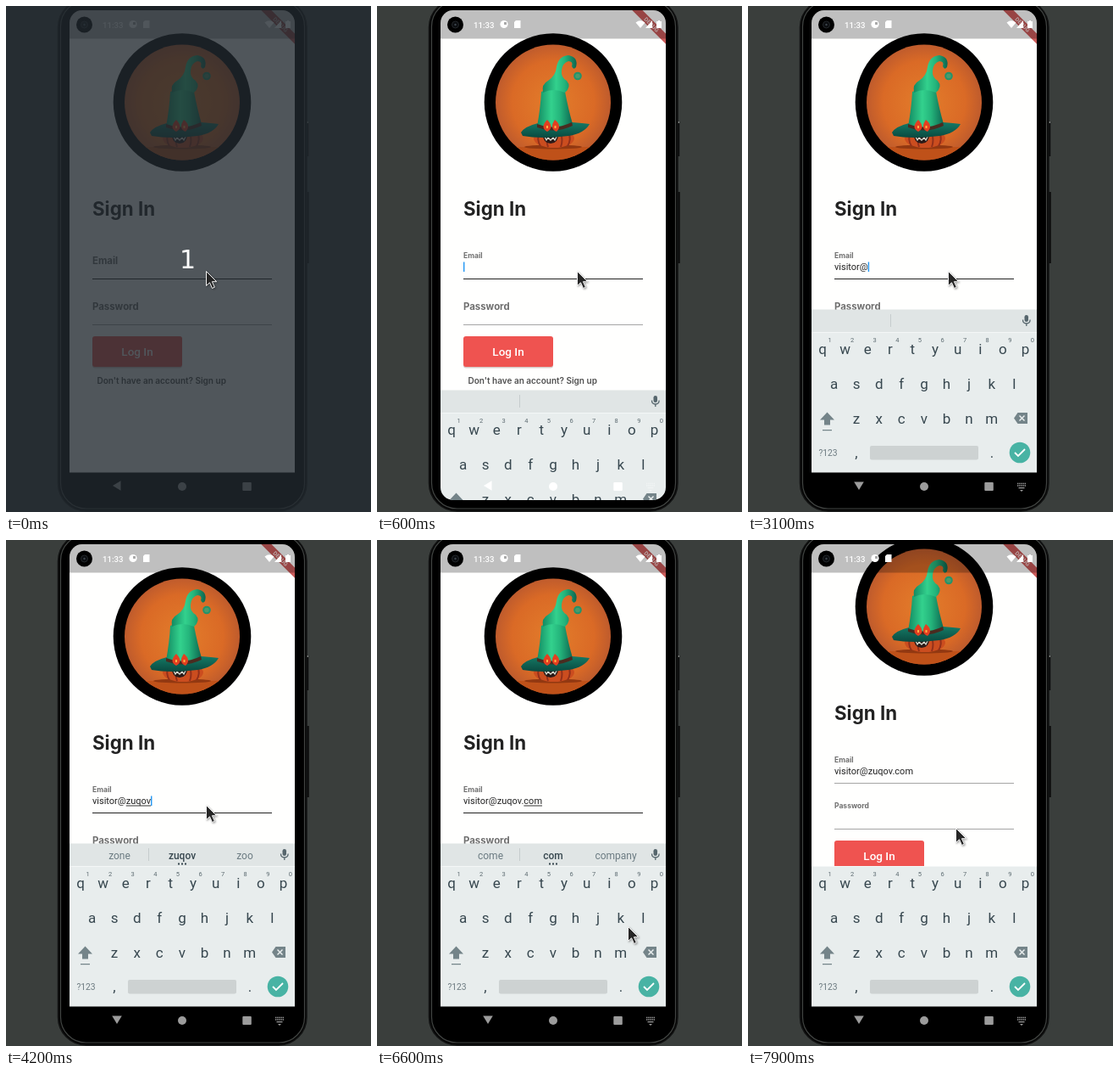
Animation of 431x596 px, one loop 8000 ms. Source, as an HTML page:

```html
<!DOCTYPE html>
<html lang="en">
<head>
<meta charset="utf-8">
<title>Sign in demo</title>
<style>
  html, body { margin: 0; width: 100%; height: 100%; overflow: hidden; background: #3a3e3c; }
  svg { display: block; width: 100vw; height: 100vh; font-family: Roboto, sans-serif; }
  .brand { font-family: Inter, sans-serif; font-weight: 600; }
  .label { font-size: 11.4px; font-weight: 700; fill: #6f6f6f; }
  .keys { fill: #37474f; text-anchor: middle; font-size: 17px; }
  .keys .hint { font-size: 7.5px; fill: #5c6a70; }
  .keys .mode { font-size: 10.3px; fill: #6d7b81; }
  .words { font-size: 12px; text-anchor: middle; fill: #6b7b82; }
  .words .best { font-weight: 500; fill: #37474f; }
  #pointer { filter: drop-shadow(1px 1px 1px rgba(0, 0, 0, .4)); }
</style>
</head>
<body>
<svg viewBox="0 0 431 596" xmlns="http://www.w3.org/2000/svg">
  <defs>
    <clipPath id="screen"><rect x="75" y="5" width="266" height="577" rx="15"/></clipPath>
    <clipPath id="disc"><circle cx="208" cy="113.500" r="68"/></clipPath>
    <radialGradient id="sky" cx=".5" cy=".5" r=".55">
      <stop offset="0" stop-color="#e37d2b"/><stop offset=".65" stop-color="#da6a26"/><stop offset="1" stop-color="#b5562f"/>
    </radialGradient>
    <linearGradient id="felt">
      <stop offset="0" stop-color="#128a62"/><stop offset=".4" stop-color="#33d18d"/><stop offset=".65" stop-color="#24b47b"/><stop offset="1" stop-color="#0d6650"/>
    </linearGradient>
    <linearGradient id="brim" x2="0" y2="1">
      <stop offset="0" stop-color="#16806a"/><stop offset="1" stop-color="#0a4a40"/>
    </linearGradient>
  </defs>

  <rect width="431" height="596" fill="#3a3e3c"/>
  <path d="M356 136v41M356.500 219v84" stroke="#0c0d0d" stroke-width="2.500"/>
  <path d="M356 136v2" stroke="#b5b8b6" stroke-width="1.500"/>
  <rect x="61.500" y="-8" width="293.500" height="603" rx="33" fill="#050505" stroke="#121313" stroke-width="1.500"/>
  <rect x="64.500" y="-6" width="288" height="598" rx="30" fill="#000" stroke="#414442" stroke-width="1.200"/>

  <g clip-path="url(#screen)">
    <rect x="75" y="5" width="266" height="545" fill="#fffffe"/>
    <g id="page">
      <circle cx="208" cy="113.500" r="81.300" fill="#000"/>
      <g clip-path="url(#disc)">
        <rect x="140" y="45" width="136" height="137" fill="url(#sky)"/>
        <path d="M140 166h136v16H140z" fill="#bf5119"/>
        <ellipse cx="208" cy="166" rx="34" ry="2.500" fill="#923811"/>
        <ellipse cx="209" cy="156" rx="24" ry="11" fill="#cb4d1f"/>
        <path d="M192 149q-4 8 1 16M202 150q-3 8 0 16M217 150q3 8 0 16M226 149q4 8-1 16" fill="none" stroke="#92301a" stroke-width="2"/>
        <path d="M196 151q9 4 18 0q0 11-9 11t-9-11z" fill="#2b1a18"/>
        <path d="M198 154l2 4 2-3 3 3 3-3 2 3 2-4" fill="none" stroke="#d8dcd0" stroke-width="1.300"/>
        <path d="M170 149Q174 142 190 138Q212 132 230 137Q243 138 251 139Q245 150 226 153Q194 157 172 153z" fill="url(#brim)"/>
        <path d="M189 142Q193 120 194 101Q208 94 222 101Q226 122 231 139Q210 149 189 142z" fill="url(#felt)"/>
        <path d="M196 102Q194 92 202 88Q211 82 212 72Q214 59 226 58Q238 60 235 72Q232 76 230 71Q232 65 226 65Q219 67 218 76Q217 84 224 88Q230 95 222 102Q208 96 196 102z" fill="url(#felt)"/>
        <path d="M189 139q20 8 41-2l1 4q-21 10-42 2z" fill="#4a2b20"/>
        <path d="M201 134q9 9 0 14q-9-5 0-14zM210 134q9 7 2 14q-9-4-2-14z" fill="#e33f20"/>
        <path d="M201 141v3M210.500 141v3" stroke="#ffad45" stroke-width="2"/>
        <circle cx="237" cy="82.500" r="3.800" fill="#4a9a6b" stroke="#23936a" stroke-width="2"/>
      </g>
      <text class="brand" x="102" y="246.500" font-size="22.300" style="font-weight:700" fill="#222">Sign In</text>
      <text class="brand label" id="emailLabel">Email</text>
      <text id="email" x="102" y="311" font-size="11" fill="#222" xml:space="preserve"></text>
      <rect id="composing" y="312.500" height="1" fill="#333"/>
      <rect id="emailLine" x="102" y="321" width="212" height="1"/>
      <text class="brand label" id="passLabel">Password</text>
      <rect x="102" y="375" width="212" height="1" fill="#a5a5a5"/>
      <rect id="caret" width="1.400" height="11.500" fill="#2196f3"/>
      <rect x="102" y="390" width="106" height="36.500" rx="3" fill="#d8c9c8"/>
      <rect x="102" y="389" width="106" height="36" rx="3" fill="#ef5350"/>
      <text x="155" y="412" font-size="13.500" font-weight="500" text-anchor="middle" fill="#fff">Log In</text>
      <text class="brand" x="107.500" y="444.500" font-size="10" fill="#505050">Don't have an account? Sign up</text>
    </g>

    <g transform="translate(324.200 21.800) rotate(45)">
      <rect x="-40" y="-4.300" width="80" height="8.600" fill="#b71c1c" fill-opacity=".72"/>
      <text y="2.500" font-size="6.800" font-weight="700" text-anchor="middle" fill="#f4dcdc">DEBUG</text>
    </g>
    <rect x="75" y="5" width="266" height="33.500" fill="#000" fill-opacity=".25"/>
    <g fill="#fff">
      <text x="114" y="25.500" font-size="9.600" font-weight="500">11:33</text>
      <circle cx="150" cy="21.500" r="4.600"/>
      <path d="M150 19h3v3h-3z" fill="#aaa"/>
      <path d="M162 19l2-2h5.500v9H162z"/>
      <path d="M305.500 19.500q5.500-4.500 11 0l-5.500 6.500zM317 26l8-9v9zM330 18h2v-1h2v1h2v8h-6z"/>
    </g>

    <g id="keyboard">
      <g id="bar">
        <rect x="75" y="357.500" width="266" height="28" fill="#e0e5e5"/>
        <path d="M168.500 363v15" stroke="#c5cccd"/>
        <g class="words" id="words">
          <text x="134" y="376"></text><text class="best" x="208" y="376"></text><text x="282" y="376"></text>
          <path id="dots" d="M203 381.500h2m2 0h2m2 0h2" stroke="#37474f" stroke-width="1.800"/>
        </g>
        <rect x="326.500" y="364" width="4.500" height="8" rx="2.200" fill="#56666d"/>
        <path d="M324.500 369.500q0 4.500 4.300 4.500t4.300-4.500M328.800 374v3" fill="none" stroke="#56666d" stroke-width="1.300"/>
      </g>
      <rect x="75" y="384" width="266" height="166" fill="#e8eded"/>
      <path d="M75 384.500h266" stroke="#f4f7f7"/>
      <g class="keys" id="keys"></g>
      <g fill="#748489">
        <path d="M93.500 478.500l8.500 9h-5v6h-7v-6h-5z"/>
        <path d="M88 499h11v1.300H88z"/>
        <path d="M314 485.500l4.500-6.500H330v13h-11.500z"/>
      </g>
      <path d="M320.500 482.500l6 6m0-6l-6 6" stroke="#e8eded" stroke-width="1.500"/>
      <rect x="144" y="518" width="128" height="16.500" rx="2" fill="#cdd2d2"/>
      <circle cx="321" cy="526" r="12.300" fill="#48b3a4"/>
      <path d="M315 526l4 4 8-8" fill="none" stroke="#fff" stroke-width="1.800"/>
    </g>
    <rect id="navFront" x="75" y="549.500" width="266" height="33"/>
    <g id="nav" fill="currentColor">
      <path id="back" d="M-5 0L4.500-5.800V5.800z"/>
      <circle cx="208" cy="566" r="5"/>
      <rect x="279.300" y="561" width="10.500" height="10" rx="1"/>
      <g id="hideKeys">
        <path d="M318 562.500h10M318 565h10" stroke="currentColor" stroke-width="1.400" stroke-dasharray="1.400 .75"/>
        <path d="M319.500 567h7v1.300h-7zM321 570h4l-2 2z"/>
      </g>
    </g>
  </g>
  <circle cx="92.500" cy="22" r="9.500" fill="#000"/>
  <circle cx="92.500" cy="22" r="4" fill="#0b0d10" stroke="#24282c"/>
  <circle cx="92.500" cy="22" r="1.200" fill="#3d454c"/>

  <g id="countdown">
    <rect width="431" height="596" fill="#21292f" fill-opacity=".79"/>
    <text x="214.500" y="309" font-size="30" text-anchor="middle" fill="#fff" font-family="DejaVu Sans, sans-serif">1</text>
  </g>
  <path id="pointer" d="M.500.500V17.500L4.500 13.800l3 6.700 2.900-1.300-3-6.500h5.300z" fill="#262626" stroke="#f4f4f4"/>
</svg>

<script>
const LOOP = 8000, STEP = 100;
const ADDRESS = 'visitor@zuqov.com';
const $ = id => document.getElementById(id);
const set = (id, attrs) => { for (const k in attrs) $(id).setAttribute(k, attrs[k]); };
const show = (id, on) => set(id, { visibility: on ? 'visible' : 'hidden' });
const lerp = (a, b, p) => a + (b - a) * p;

// [time, letters typed, suggestions]
const typing = [
  [0, 0, ''], [1400, 1, ''], [1500, 1, 'very v via'], [1800, 2, ''], [2000, 2, 'video vi view'],
  [2100, 3, ''], [2200, 3, 'visit vis vision'], [2300, 4, 'visit visi vision'],
  [2500, 5, 'visits visit visiting'], [2700, 6, ''], [2800, 6, 'visits visito visitor'],
  [3000, 7, 'visit visitor visitors'], [3100, 8, ''],
  [3500, 9, ''], [3600, 9, 'zone z zoo'], [3700, 10, ''], [3800, 11, ''],
  [3900, 11, 'zone zuq zoo'], [4000, 12, ''], [4100, 13, ''], [4200, 13, 'zone zuqov zoo'],
  [4400, 14, ''], [4500, 15, ''], [4600, 15, 'can c come'], [4700, 16, 'come co could'],
  [4800, 17, 'come com company'], [7400, 17, ''],
];
// [time, value, ...]
const slide = [[0, 260], [500, 260], [600, 95], [700, 42], [800, 15], [900, 4], [1000, 0]];
const scroll = [[7300, 0], [7500, -35]];
const emailFloat = [[400, 0], [600, 1]];
const passFloat = [[7300, 0], [7500, 1]];
const backTurn = [[600, 0], [800, -90]];
const pointer = [[5500, 236, 312], [5800, 250, 236], [6100, 285, 345], [6400, 316, 488],
  [6600, 296, 455], [7000, 262, 372], [7300, 245, 339]];

function track(points, t, column = 1) {
  const next = points.findIndex(p => p[0] > t);
  if (next === 0) return points[0][column];
  if (next < 0) return points[points.length - 1][column];
  const a = points[next - 1], b = points[next];
  return lerp(a[column], b[column], (t - a[0]) / (b[0] - a[0]));
}

function addKey(label, x, y, cls = '') {
  const key = document.createElementNS('http://www.w3.org/2000/svg', 'text');
  key.textContent = label;
  key.setAttribute('x', x);
  key.setAttribute('y', y);
  key.setAttribute('class', cls);
  $('keys').append(key);
}
[['qwertyuiop', 88, 409.8], ['asdfghjkl', 101.5, 451], ['zxcvbnm', 128, 491.5]].forEach(([row, x, y]) =>
  [...row].forEach((letter, i) => addKey(letter, x + i * 26.6, y)));
[...'1234567890'].forEach((digit, i) => addKey(digit, 96.5 + i * 26.6, 396, 'hint'));
addKey('?123', 94.5, 530, 'mode');
addKey(',', 128, 532);
addKey('.', 288, 532);

function placeLabel(id, y, p) {
  set(id, { transform: `translate(102 ${lerp(y, y - 7.5, p)}) scale(${lerp(1, .75, p)})` });
}

function drawText(t) {
  const [since, count, words] = typing.filter(s => s[0] <= t).pop();
  const typed = ADDRESS.slice(0, count), email = $('email');
  if (email.textContent !== typed) email.textContent = typed;
  const widthOf = n => n ? email.getSubStringLength(0, n) : 0;

  const wordStart = Math.max(typed.lastIndexOf('@'), typed.lastIndexOf('.')) + 1;
  const startX = widthOf(wordStart);
  set('composing', { x: 102 + startX, width: words ? widthOf(count) - startX : 0 });
  const list = words.split(' ');
  $('words').querySelectorAll('text').forEach((node, i) => node.textContent = list[i] || '');
  show('dots', words);

  const inPassword = t >= 7400;
  const blinkFrom = inPassword ? 7400 : t < 1400 ? 500 : t < 4900 ? since : 4900;
  show('caret', t >= 500 && Math.floor((t - blinkFrom) / 500) % 2 === 0);
  set('caret', { x: inPassword ? 102 : 102 + widthOf(count), y: inPassword ? 355 : 301.5 });
}

function draw(t) {
  const opening = t >= 600 && t < 800;
  show('countdown', t < 100);
  set('pointer', { transform: `translate(${track(pointer, t)} ${track(pointer, t, 2)})` });
  set('page', { transform: `translate(0 ${track(scroll, t)})` });
  placeLabel('emailLabel', 304, track(emailFloat, t));
  placeLabel('passLabel', 358, track(passFloat, t));
  set('emailLine', { fill: t < 7400 ? '#222' : '#a5a5a5' });
  set('keyboard', { transform: `translate(0 ${track(slide, t)})` });
  show('bar', t < 7400);
  show('navFront', !opening);
  set('nav', { color: opening ? '#fff' : '#9c9c9c' });
  set('back', { transform: `translate(131 565) rotate(${track(backTurn, t)})` });
  set('hideKeys', { opacity: t < 600 ? 0 : opening ? .4 : 1 });
  drawText(t);
}

const start = performance.now();
function tick() {
  const t = (performance.now() - start) % LOOP;
  draw(Math.floor(t / STEP) * STEP);
  requestAnimationFrame(tick);
}
tick();
</script>
</body>
</html>
```
